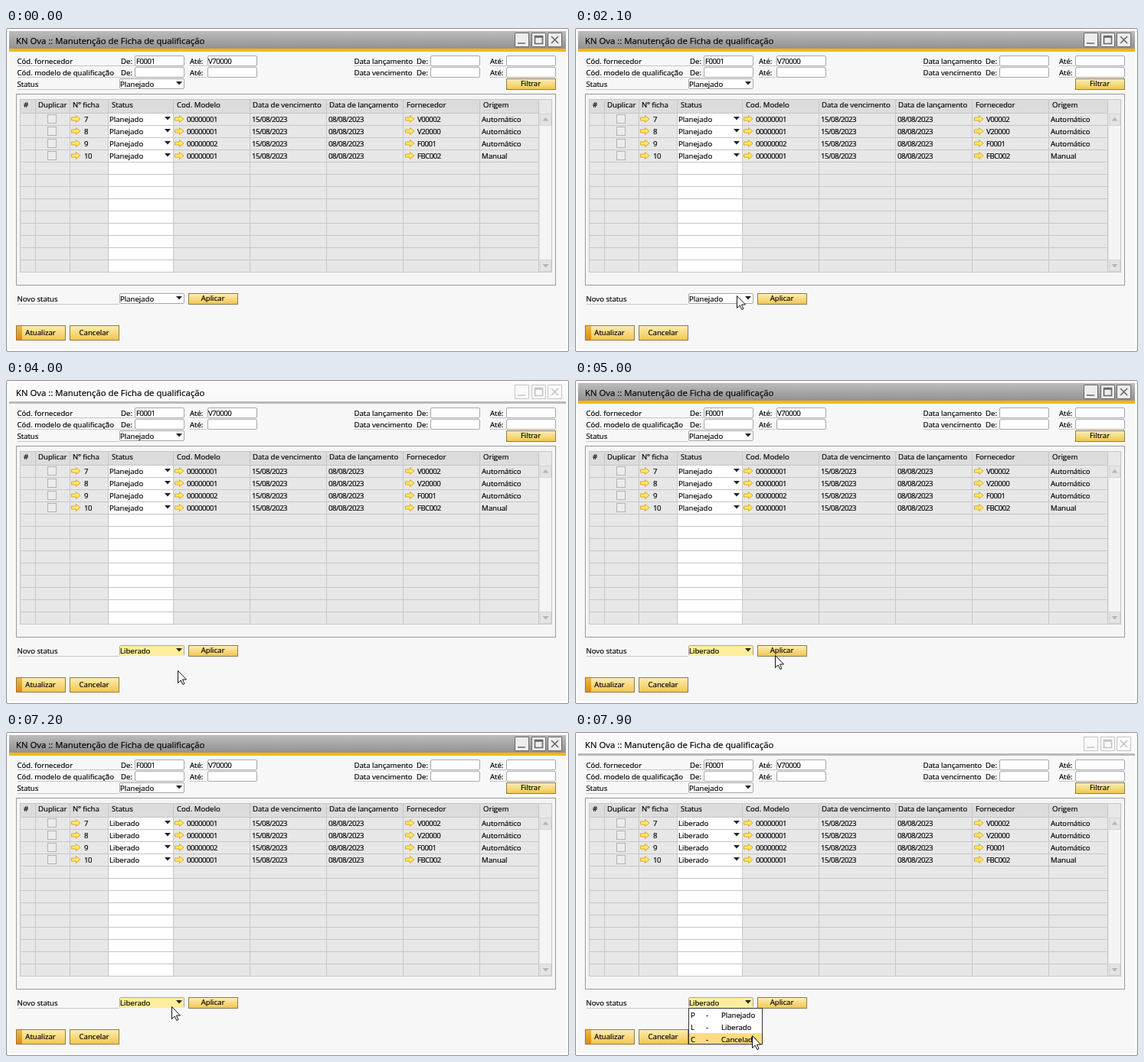
An HTML page for the animation above (8 s loop, 735 by 424 pixels).

```html
<!DOCTYPE html>
<html lang="pt-BR">
<head>
<meta charset="utf-8">
<title>Manutenção de Ficha de qualificação</title>
<style>
html, body { margin: 0; width: 100%; height: 100%; overflow: hidden; background: #fff; }
svg { display: block; width: 735px; height: 424px; }
text { font: 9.6px "Open Sans", "Noto Sans", sans-serif; fill: #000; stroke: #000; stroke-width: .2px; white-space: pre; }
.title { font-size: 11.35px; }
.num { letter-spacing: -.5px; }
.mid { text-anchor: middle; }
rect, .line { shape-rendering: crispEdges; }
.input { fill: #fff; stroke: #a6a6a6; shape-rendering: auto; }
.btn { fill: url(#gold); stroke: #8d7c4a; }
.line { stroke: #c6c6c6; fill: none; }
.anim { animation: 8s step-end infinite; }

#active { animation-name: active; }
@keyframes active { 0%, 62.5% { opacity: 1 } 32.5%, 91.25% { opacity: 0 } }
#focus { animation-name: focus; }
@keyframes focus { 0% { opacity: 0 } 31.25% { opacity: 1 } }
#oldPick { animation-name: pickOff; }
#newPick { animation-name: pickOn; }
@keyframes pickOff { 0% { opacity: 1 } 50% { opacity: 0 } }
@keyframes pickOn { 0% { opacity: 0 } 50% { opacity: 1 } }
#oldRows { animation-name: rowsOff; }
#newRows { animation-name: rowsOn; }
@keyframes rowsOff { 0% { opacity: 1 } 68.75% { opacity: 0 } }
@keyframes rowsOn { 0% { opacity: 0 } 68.75% { opacity: 1 } }
#list { animation-name: list; }
@keyframes list { 0%, 50% { opacity: 0 } 32.5%, 91.25% { opacity: 1 } }
#hover { animation-name: hover; }
@keyframes hover {
  0%, 95% { transform: translateY(0) }
  41.25%, 91.25%, 97.5% { transform: translateY(16px) }
  98.75% { transform: translateY(32px) }
}
#cursor { animation-name: cursor; }
@keyframes cursor {
  0% { transform: translate(190px, -30px) }
  6.25% { transform: translate(188px, -8px) }
  7.5% { transform: translate(184px, 9px) }
  8.75% { transform: translate(178px, 33px) }
  10% { transform: translate(172px, 63px) }
  11.25% { transform: translate(167px, 95px) }
  12.5% { transform: translate(164px, 126px) }
  13.75% { transform: translate(164px, 152px) }
  15% { transform: translate(166px, 173px) }
  16.25% { transform: translate(169px, 186px) }
  18.75% { transform: translate(183px, 226px) }
  20% { transform: translate(197px, 262px) }
  22.5% { transform: translate(199px, 278px) }
  23.75% { transform: translate(203px, 306px) }
  25% { transform: translate(208px, 334px) }
  26.25% { transform: translate(211px, 350px) }
  37.5% { transform: translate(212px, 354px) }
  38.75% { transform: translate(214px, 362px) }
  40% { transform: translate(217px, 371px) }
  41.25% { transform: translate(221px, 378px) }
  43.75% { transform: translate(224px, 380px) }
  55% { transform: translate(227px, 378px) }
  56.25% { transform: translate(236px, 373px) }
  57.5% { transform: translate(247px, 367px) }
  58.75% { transform: translate(257px, 362px) }
  60% { transform: translate(261px, 360px) }
  81.25% { transform: translate(250px, 359px) }
  82.5% { transform: translate(236px, 359px) }
  85% { transform: translate(226px, 359px) }
  86.25% { transform: translate(217px, 359px) }
  90% { transform: translate(216px, 359px) }
  95% { transform: translate(219px, 367px) }
  96.25% { transform: translate(223px, 376px) }
  97.5% { transform: translate(227px, 387px) }
  98.75% { transform: translate(231px, 397px) }
}
</style>
</head>
<body>
<svg viewBox="0 0 735 424">
  <defs>
    <linearGradient id="gold" x2="0" y2="1"><stop stop-color="#fdeeb4"/><stop offset="1" stop-color="#f1c64e"/></linearGradient>
    <linearGradient id="bar" x2="0" y2="1"><stop stop-color="#bcbcbc"/><stop offset="1" stop-color="#8f8f8f"/></linearGradient>
    <linearGradient id="stripe" x2="0" y2="1"><stop stop-color="#f6b53a"/><stop offset="1" stop-color="#e08a0c"/></linearGradient>
    <path id="link" d="M.5 -2H6.500V-4.500L12 0 6.500 4.500V2H.5Z" fill="#ffe768" stroke="#d6ab2c" stroke-linejoin="round"/>
    <path id="drop" d="M0 0H8L4 4.500Z" fill="#222"/>
    <g id="winBtns" fill="none">
      <path d="M664.500 6.500h18v18h-18zM686.500 6.500h18v18h-18zM707.500 6.500h18v18h-18z"/>
      <path d="M668 20H678M690.500 10.500h10v10h-10zM690 12h11M712 11l9 9M721 11l-9 9" stroke-width="1.600"/>
    </g>
  </defs>

  <rect width="735" height="424" fill="#fdfdfd"/>
  <rect x=".5" y=".5" width="734" height="423" rx="2" fill="none" stroke="#8c8c8c"/>
  <rect x="4" y="4" width="727" height="416" fill="#f7f7f7"/>
  <rect x="4" y="4" width="727" height="27" fill="#fafafa"/>
  <rect x="4" y="28" width="727" height="3" fill="#b9b9b9"/>
  <use href="#winBtns" stroke="#c4c4c4"/>
  <g id="active" class="anim">
    <rect x="4" y="4" width="727" height="24" fill="url(#bar)"/>
    <rect x="4" y="27" width="727" height="4" fill="#fdb515"/>
    <path d="M664 6h19v19h-19zM686 6h19v19h-19zM707 6h19v19h-19z" fill="#ededed"/>
    <use href="#winBtns" stroke="#686868"/>
  </g>
  <text class="title" x="13" y="21">KN Ova :: Manutenção de Ficha de qualificação</text>

  <g id="form"></g>
  <rect x="13.500" y="86.500" width="704" height="250" fill="#f5f5f5" stroke="#999"/>
  <g id="grid"></g>
  <g id="oldRows" class="anim"></g>
  <g id="newRows" class="anim"></g>

  <rect id="focus" class="anim" x="149" y="348" width="83" height="13" fill="#ffee9c"/>
  <text id="oldPick" class="anim" x="149" y="358">Planejado</text>
  <text id="newPick" class="anim" x="149" y="358">Liberado</text>
  <use href="#drop" x="222" y="351"/>

  <g id="list" class="anim">
    <rect x="148" y="361" width="97" height="48" fill="#fff"/>
    <rect id="hover" class="anim" x="149" y="362" width="95" height="15" fill="#ffdc80"/>
    <rect x="148.500" y="361.500" width="96" height="47" fill="none" stroke="#333"/>
    <g id="options"></g>
  </g>
  <path id="cursor" class="anim" d="M.5 .5V16.500L4.200 13 6.800 18.500 9 17.500 6.500 12H11.500Z" fill="#fff" stroke="#111"/>
</svg>
<script>
const add = (id, html) => document.getElementById(id).insertAdjacentHTML('beforeend', html);
const text = (x, y, s, cls = '') => `<text x="${x}" y="${y}" class="${cls}">${s}</text>`;
const box = (x, y, w, h, attrs) => `<rect x="${x}" y="${y}" width="${w}" height="${h}" ${attrs}/>`;
const line = d => `<path class="line" d="${d}"/>`;
const use = (id, x, y) => `<use href="#${id}" x="${x}" y="${y}"/>`;
const input = (x, y, w = 64) => box(x + .5, y + .5, w, 13, 'rx="1.5" class="input"');
const button = (x, y, w, h, s) =>
  box(x + .5, y + .5, w, h, 'class="btn"') + text(x + w / 2, y + h / 2 + 3, s, 'mid');

// Filter form
let form = '';
const range = (y, left, right, from, to) => {
  form += line(`M15 ${y + 13.5}H168M240 ${y + 13.5}H263M454 ${y + 13.5}H554M632 ${y + 13.5}H653`);
  form += text(14.5, y + 11, left) + text(150, y + 11, 'De:') + text(240, y + 11, 'Até:');
  form += text(454.5, y + 11, right) + text(536, y + 11, 'De:') + text(632, y + 11, 'Até:');
  for (const x of [168, 263, 554, 653]) form += input(x, y);
  form += text(170, y + 11, from, 'num') + text(264, y + 11, to, 'num');
};
range(36, 'Cód. fornecedor', 'Data lançamento', 'F0001', 'V70000');
range(51, 'Cód. modelo de qualificação', 'Data vencimento', '', '');
form += line('M15 80.5H148M15 361.5H148') + text(14.5, 77, 'Status') + text(14.5, 358, 'Novo status');
form += input(148, 66, 84) + text(149, 77, 'Planejado') + use('drop', 222, 70) + input(148, 347, 84);
form += button(653, 66, 64, 14, 'Filtrar') + button(238, 347, 64, 14, 'Aplicar');
form += button(13, 389, 64, 19, 'Atualizar') + button(83, 389, 64, 19, 'Cancelar');
form += box(14, 390, 7, 18, 'fill="url(#stripe)"');
add('form', form);

// Table
const edges = [18, 38, 83, 133, 218, 318, 418, 518, 618, 695];
let grid = box(18, 93, 694, 226, 'fill="#e7e7e7"') + box(18, 93, 677, 18, 'fill="#dcdcdc"');
grid += box(134, 111, 84, 208, 'fill="#fff"');
for (const x of edges) grid += line(`M${x + .5} 93V319`);
for (let i = 0; i <= 13; i++) grid += line(`M18 ${111.5 + 16 * i}H695`);
grid += line('M18 93.500H712.500V319.500H695');
grid += box(697, 112, 15, 207, 'fill="#f4f4f4"');
for (const y of [112, 303]) grid += box(697.5, y + .5, 14, 15, 'fill="#e4e4e4" stroke="#d4d4d4"');
grid += '<path d="M700.500 121.500h8l-4 -4.500zM700.500 309h8l-4 4.500z" fill="#b4b4b4"/>';
[['#', 23], ['Duplicar', 42], ['Nº ficha', 87], ['Status', 138], ['Cod. Modelo', 223],
 ['Data de vencimento', 322], ['Data de lançamento', 422], ['Fornecedor', 523], ['Origem', 623]]
  .forEach(([s, x]) => grid += text(x, 104, s));
[['7', 1, 'V00002', 'Automático'], ['8', 1, 'V20000', 'Automático'],
 ['9', 2, 'F0001', 'Automático'], ['10', 1, 'FBC002', 'Manual']].forEach(([id, model, code, origin], i) => {
  const y = 119 + 16 * i, base = y + 4;
  grid += box(54.5, y - 5.5, 11, 11, 'fill="#ececec" stroke="#b3b3b3"');
  for (const x of [85, 220, 521]) grid += use('link', x, y);
  grid += use('drop', 207, y - 3) + text(102, base, id, 'num') + text(236, base, '0000000' + model, 'num');
  grid += text(321, base, '15/08/2023', 'num') + text(421, base, '08/08/2023', 'num');
  grid += text(537, base, code, 'num') + text(621, base, origin);
  add('oldRows', text(135, base, 'Planejado'));
  add('newRows', text(135, base, 'Liberado'));
});
add('grid', grid);

['Planejado', 'Liberado', 'Cancelado'].forEach((s, i) => {
  const y = 374 + 16 * i;
  add('options', text(151, y, s[0]) + text(171, y, '-') + text(191, y, s));
});
</script>
</body>
</html>
```
